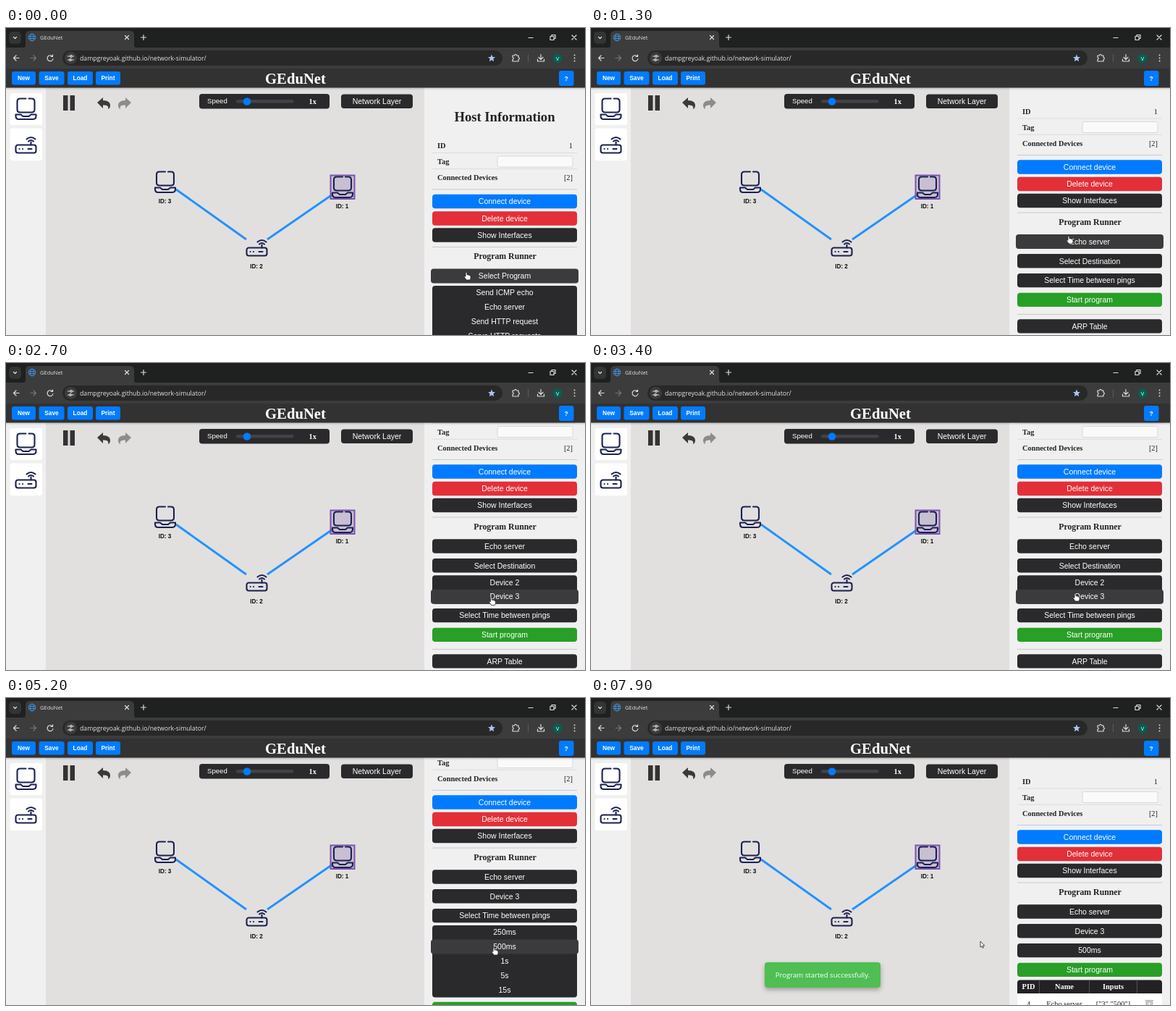
Recreate the animation shown at these times as an HTML page. Size 800x424 px, loop 8000 ms.

```html
<!DOCTYPE html>
<html lang="en">
<head>
<meta charset="utf-8">
<title>GEduNet</title>
<style>
html, body { margin: 0; width: 100%; height: 100%; overflow: hidden; }
svg { display: block; }
text { font-family: "Liberation Sans", Arial, sans-serif; }
.serif { font-family: "Liberation Serif", "Times New Roman", serif; }
.ui { font-family: "Open Sans", "Noto Sans", sans-serif; }
.b { font-weight: bold; }
.mid { text-anchor: middle; }
.end { text-anchor: end; }
.line { fill: none; stroke: #dedede; stroke-width: 1.2; stroke-linecap: round; stroke-linejoin: round; }
.icon { fill: none; stroke: #1b2150; stroke-width: 2.1; stroke-linecap: round; stroke-linejoin: round; }
</style>
</head>
<body>
<svg width="800" height="424" viewBox="0 0 800 424">
  <defs>
    <g id="laptop" class="icon">
      <path d="M4 -14H8Q12 -14 12 -10V1Q12 5 8 5H-8Q-12 5 -12 1V-10Q-12 -14 -8 -14H0"/>
      <path d="M-14 8H-7L-4 10.5H4L7 8H14V10Q14 14.500 10 14.500H-10Q-14 14.500 -14 10Z"/>
    </g>
    <g id="router" class="icon">
      <rect x="-14" y="1" width="28" height="11" rx="3"/>
      <path d="M7 1V-3M3.500 -4Q7 -7 10.500 -4M1 -7Q7 -12 13 -7M-9 6.500h.1M-4.500 6.500h.1M3 6.500H8"/>
    </g>
    <path id="reply" d="M126 103L134 96V100C141 100 144 103 144 107C144 110 142.500 111.500 141 112C142.500 107.500 139 106.500 134 106.500V111Z"/>
    <linearGradient id="fade" x2="0" y2="1">
      <stop offset="0" stop-opacity=".18"/><stop offset="1" stop-opacity="0"/>
    </linearGradient>
    <filter id="shadow" x="-20%" y="-40%" width="140%" height="200%">
      <feDropShadow dx="0" dy="3" stdDeviation="3" flood-opacity=".3"/>
    </filter>
    <clipPath id="side"><rect x="578" y="82" width="222" height="342"/></clipPath>
  </defs>

  <!-- Browser frame -->
  <rect width="800" height="28" fill="#1f2020"/>
  <rect x="4" y="5" width="17" height="17" rx="5" fill="#333434"/>
  <path d="M22 28Q27 28 27 23V10Q27 4 33 4H171Q177 4 177 10V23Q177 28 182 28Z" fill="#3c3c3c"/>
  <rect y="27" width="800" height="29" fill="#3c3c3c"/>
  <rect x="78" y="31" width="608" height="21" rx="10.5" fill="#282828"/>
  <circle cx="89.500" cy="41.500" r="8.500" fill="#3c3c3c"/>
  <g fill="none" stroke="#3f8fd8" stroke-width="1">
    <circle cx="36" cy="13" r="4.800"/><ellipse cx="36" cy="13" rx="2.200" ry="4.800"/>
    <path d="M31.500 11.500H40.500M31.500 14.500H40.500"/>
  </g>
  <text class="ui" x="47" y="16" font-size="7.5" fill="#e4e4e4">GEduNet</text>
  <text class="ui" x="102" y="44.500" font-size="8.7" fill="#e4e4e4">dampgreyoak.github.io/network-simulator/</text>
  <g class="line">
    <path d="M10.500 12.500L12.500 14.500L14.500 12.500M164.500 10.500L169.500 15.500M169.500 10.500L164.500 15.500M186.500 13H193.500M190 9.500V16.500"/>
    <path d="M722 13.500H728M752 11.500H757V16.500H752ZM754 11V9.500H759V14.500H757.500M782 10L788 16M788 10L782 16"/>
    <path d="M18 41.500H10.500M14 38L10.500 41.500L14 45M64 39A4 4 0 1 0 65 42.500M64.500 37V39.500H62"/>
    <path d="M34 41.500H41.500M38 38L41.500 41.500L38 45" stroke="#777"/>
    <path d="M85.500 39H88M92 39H93.500M85.500 44H87M91 44H93.500"/>
    <circle cx="90" cy="39" r="1.300"/><circle cx="89" cy="44" r="1.300"/>
    <path d="M700 38H702.500Q704 34.500 705.500 38H708V40.500Q711 42 708 43.500V46H700V43.500Q702.500 42 700 40.500Z"/>
    <path d="M739 36.500V43M736 40.500L739 43.500L742 40.500M734.500 43V46H743.500V43"/>
    <path d="M785.500 37.500h.1M785.500 41.500h.1M785.500 45.500h.1" stroke-width="1.800"/>
  </g>
  <path d="M671 36.500L672.400 39.900L676 40.200L673.300 42.600L674.100 46.200L671 44.300L667.900 46.200L668.700 42.600L666 40.200L669.600 39.900Z" fill="#a8c7fa"/>
  <path d="M721.500 36V47" stroke="#5c5c5c"/>
  <circle cx="762" cy="42" r="6.500" fill="#075e54"/>
  <text class="ui mid" x="762" y="44.800" font-size="7.5" fill="#fff">V</text>

  <!-- Page -->
  <rect y="82" width="800" height="342" fill="#f0f0f0"/>
  <rect x="55" y="82" width="523" height="342" fill="#e1e0df"/>
  <g id="panel" clip-path="url(#side)"></g>
  <rect y="82" width="800" height="4" fill="url(#fade)"/>
  <rect y="56" width="800" height="26.500" fill="#323232"/>
  <g id="menu"></g>
  <text class="serif b mid" x="400" y="77" font-size="20.7" fill="#fff">GEduNet</text>

  <rect x="5.500" y="90" width="44.500" height="44" rx="3" fill="#fff"/>
  <rect x="5.500" y="138.500" width="44.500" height="44.500" rx="3" fill="#fff"/>
  <use href="#laptop" x="27.500" y="111.500"/>
  <use href="#router" x="27.500" y="160.500"/>

  <path d="M79 93H85.500V114H79ZM88.500 93H95V114H88.500Z" fill="#333"/>
  <use href="#reply" fill="#3a3a3a"/>
  <use href="#reply" fill="#8c8c8c" transform="matrix(-1 0 0 1 299 0)"/>
  <rect x="267" y="91" width="180" height="20.500" rx="4" fill="#2a2a2c"/>
  <text x="278" y="104" font-size="9.6" fill="#fff">Speed</text>
  <rect x="318" y="99" width="79.500" height="4.500" rx="2.200" fill="#434346"/>
  <circle cx="333" cy="101.500" r="5.300" fill="#007bff"/>
  <text class="serif b" x="418.500" y="104.500" font-size="10.4" fill="#fff">1x</text>
  <rect x="463" y="91.500" width="99" height="19.500" rx="4" fill="#2a2a2c"/>
  <text class="mid" x="512.500" y="105" font-size="10.5" fill="#fff">Network Layer</text>

  <path d="M235 223L332 292M361 292L451 230" stroke="#2491ff" stroke-width="3"/>
  <rect x="448.500" y="203.500" width="33" height="32.500" fill="#6a3fa0" fill-opacity=".2" stroke="#7c52ae" stroke-width="2"/>
  <use href="#laptop" x="220" y="212.500"/>
  <use href="#laptop" x="465" y="219.500"/>
  <use href="#router" x="346.500" y="302.500"/>
  <g class="b mid" font-size="8.2" fill="#111">
    <text x="219.500" y="242">ID: 3</text>
    <text x="464.500" y="249">ID: 1</text>
    <text x="346" y="332">ID: 2</text>
  </g>

  <g id="toast">
    <rect x="240" y="365" width="160" height="35" rx="4" fill="#50be52" filter="url(#shadow)"/>
    <text class="ui mid" x="320" y="386" font-size="9.6" fill="#fff">Program started successfully.</text>
  </g>
  <g id="cursor" fill="#fff" stroke="#222" stroke-width=".8" stroke-linejoin="round">
    <path id="hand" d="M-1 1Q0 -.5 1 1V4Q2.500 3.200 3 4.300Q4.300 3.700 4.600 5Q6 4.700 6 6V8.500Q5.500 10 5 11H0Q-1 9 -3 6.800Q-3 5.300 -1 6.300Z"/>
    <path id="arrow" d="M0 0V8.200L1.900 6.500L3.200 9.300L4.500 8.700L3.200 6H5.800Z"/>
  </g>
</svg>
<script>
const LOOP = 8000;
const ECHO = 1100, OPEN_DEST = 2300, DEST = 3700, OPEN_TIME = 4700, TIME = 5600, START = 7250;
const DARK = '#2a2a2c', HOVER = '#3b3b3d';
const programs = ['Send ICMP echo', 'Echo server', 'Send HTTP request', 'Serve HTTP requests', 'Send ARP request'];
const devices = ['Device 2', 'Device 3'];
const delays = ['250ms', '500ms', '1s', '5s', '15s'];

// Tracks hold [time, ...values]
const scrollTrack = [[0, 0], [100, 0], [500, 95.5], [ECHO, 95.5], [ECHO, 47.5], [OPEN_DEST, 47.5], [OPEN_DEST, 89.5],
  [DEST, 89.5], [DEST, 47.5], [OPEN_TIME, 47.5], [4900, 95.5], [TIME, 95.5], [TIME, 47.5]];
const cursorTrack = [[0, 636, 337], [100, 636, 337], [500, 651, 311], [650, 651, 311], [950, 660, 287], [1400, 660, 287],
  [1900, 671, 326], [2400, 671, 326], [3200, 669, 318], [3800, 669, 318], [4500, 674, 344], [6850, 674, 344],
  [7100, 676, 371], [7350, 676, 371], [7800, 538, 336]];
const hoverTrack = [[0, 'Select Program'], [350, 'Serve HTTP requests'], [700, 'Send HTTP request'], [800, 'Echo server'],
  [1700, 'Select Destination'], [OPEN_DEST, 'Device 3'], [4300, 'Select Time between pings'], [4850, '500ms'],
  [6950, 'Start program'], [7400, '']];

const $ = id => document.getElementById(id);
const last = (track, t) => track.findLastIndex(k => k[0] <= t);

function at(track, t) {
  const i = last(track, t), a = track[i], b = track[i + 1];
  if (!b) return a.slice(1);
  const p = (t - a[0]) / (b[0] - a[0]), e = p * p * (3 - 2 * p);
  return a.slice(1).map((v, k) => v + (b[k + 1] - v) * e);
}

const text = (s, x, y, size, cls = '', fill = '#222') =>
  `<text class="${cls}" x="${x}" y="${y}" font-size="${size}" fill="${fill}">${s}</text>`;
const box = (x, y, w, h, fill, r = 4, extra = '') =>
  `<rect x="${x}" y="${y}" width="${w}" height="${h}" rx="${r}" fill="${fill}" ${extra}/>`;
const rule = (y, color = '#c9c9c9') => `<path d="M589 ${y}H789" stroke="${color}"/>`;
const label = (s, y) => text(s, 689, y + 3.7, 10.5, 'mid', '#fff');

function button(s, y, hover, fill = DARK, hoverFill = HOVER) {
  const on = s === hover;
  return (on ? box(587, y - 10, 204, 20, hoverFill) : box(589, y - 9.7, 200, 19.4, fill)) + label(s, y);
}

function options(list, y, hover) {
  return box(589, y - 9.5, 200, list.length * 20 - .5, DARK) + list.map((s, i) =>
    (s === hover ? box(587, y + i * 19.9 - 10, 204, 20, HOVER) : '') + label(s, y + i * 19.9)).join('');
}

function processTable(y) {
  const cell = (s, x, dy, cls, fill) => text(s, x, y + dy, 10.4, 'serif mid ' + cls, fill);
  return box(589, y + 9, 200, 40, '#fff', 0) +
    `<path d="M589 ${y + 18.5}V${y + 4}Q589 ${y} 593 ${y}H785Q789 ${y} 789 ${y + 4}V${y + 18.5}Z" fill="#222224"/>` +
    `<path d="M619.5 ${y}v18.500M688.500 ${y}v18.500M754.500 ${y}v18.500" stroke="#666" stroke-width=".7"/>` +
    cell('PID', 604.5, 12.5, 'b', '#fff') + cell('Name', 654, 12.5, 'b', '#fff') + cell('Inputs', 721.5, 12.5, 'b', '#fff') +
    cell('4', 604.5, 36.5) + cell('Echo server', 654, 36.5) + cell('["3","500"]', 721.5, 36.5) +
    `<path d="M765.5 ${y + 28.5}h11.500M767 ${y + 30.5}l1 9h6.500l1 -9zM769.500 ${y + 32}v6M773 ${y + 32}v6" fill="none" stroke="#888"/>`;
}

function panel(t) {
  const hover = hoverTrack[last(hoverTrack, t)][1];
  let out = text('Host Information', 689, 129, 18.6, 'serif b mid');
  [['ID', '1'], ['Tag', ''], ['Connected Devices', '[2]']].forEach(([name, value], i) => {
    const y = 166 + i * 22.2;
    out += text(name, 596, y, 10.4, 'serif b') + text(value, 783, y, 10.4, 'serif end');
    if (i < 2) out += rule(y + 6.5, '#dcdcdc');
  });
  out += box(679, 177, 104, 15, '#fafafa', 2, 'stroke="#d8d8d8"') + rule(223) +
    button('Connect device', 239.5, hover, '#007bff') + button('Delete device', 263, hover, '#e32f38') +
    button('Show Interfaces', 286, hover) + rule(302.5) + text('Program Runner', 689.5, 319, 11.8, 'serif b mid');

  let y = 342.5;
  const select = (name, list, open) => {
    out += button(name, y, hover);
    if (open) {
      out += options(list, y + 23, hover);
      y += 102 - (5 - list.length) * 20;
    }
    y += 26.8;
  };
  select(t < ECHO ? 'Select Program' : 'Echo server', programs, t < ECHO);
  if (t >= ECHO) {
    select(t < DEST ? 'Select Destination' : 'Device 3', devices, t >= OPEN_DEST && t < DEST);
    select(t < TIME ? 'Select Time between pings' : '500ms', delays, t >= OPEN_TIME && t < TIME);
  }
  out += button('Start program', y, hover, '#289f26', '#249022');
  return out + (t >= START ? processTable(y + 14) : rule(y + 20) + button('ARP Table', y + 36.5, hover));
}

$('menu').innerHTML = [['New', 8, 33], ['Save', 45.5, 35], ['Load', 85, 35], ['Print', 124, 34]].map(([s, x, w]) =>
  box(x, 60, w, 18.5, '#007bff', 3) + text(s, x + w / 2, 72.3, 8.3, 'b mid', '#fff')).join('') +
  box(764, 59, 20.5, 21, '#007bff', 3) + text('?', 774, 72.5, 8.5, 'b mid', '#fff');

let shown = '';
function draw(now) {
  const t = now % LOOP, [scroll] = at(scrollTrack, t), [x, y] = at(cursorTrack, t);
  const content = `<g transform="translate(0 ${-scroll})">${panel(t)}</g>`;
  if (content !== shown) $('panel').innerHTML = shown = content;
  $('toast').setAttribute('opacity', Math.min(1, Math.max(0, (t - START) / 250)));
  $('cursor').setAttribute('transform', `translate(${x} ${y})`);
  const arrow = x < 589;
  $('hand').style.display = arrow ? 'none' : '';
  $('arrow').style.display = arrow ? '' : 'none';
  requestAnimationFrame(draw);
}
draw(0);
</script>
</body>
</html>
```
